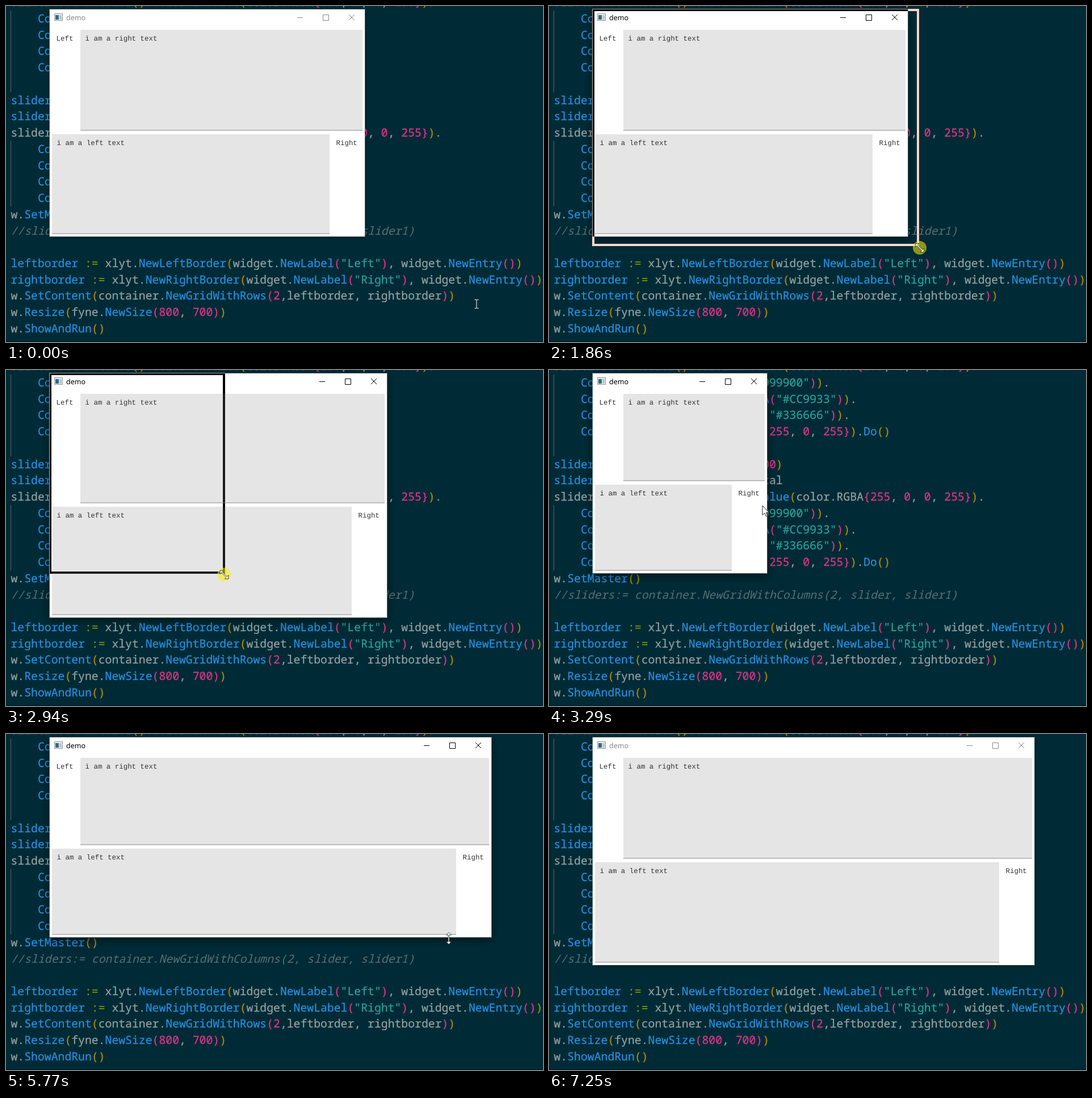
An HTML page for the animation above (7380 ms loop, 946 by 592 pixels).

```html
<!DOCTYPE html>
<html lang="en">
<head>
<meta charset="utf-8">
<title>demo</title>
<style>
html, body { margin: 0; width: 100%; height: 100%; overflow: hidden; background: #002b36; }
svg { display: block; width: 946px; height: 592px; }
text { white-space: pre; text-rendering: geometricPrecision; }
.code { font: 19.77px "Noto Sans Mono", monospace; color: #93a1a1; }
.code, .code tspan { fill: currentColor; stroke: currentColor; stroke-width: .25; }
.code .comment { font-style: italic; color: #586e75; stroke-width: 0; }
.fn { color: #268fe0; }
.op { color: #859900; }
.num { color: #dc3688; }
.str { color: #2aa198; }
.b0 { color: #b58900; }
.b1 { color: #dc3688; }
.ui { font: 12.45px "Liberation Mono", monospace; fill: #333; }
.title { font: 12.5px "Noto Sans", sans-serif; }
.entry { fill: #e5e5e5; }
.line { fill: #bdbdbd; }
.idle { filter: drop-shadow(0 1px 3px rgba(0,0,0,.5)); }
.active { filter: drop-shadow(0 4px 8px rgba(0,0,0,.55)); }
#edge { fill: none; stroke: #6d7f84; stroke-opacity: .6; }
#frame { fill: none; stroke: #fff; stroke-width: 4; mix-blend-mode: difference; }
#shape { fill: #fff; stroke: #222; }
</style>
</head>
<body>
<svg viewBox="0 0 946 592">
  <rect width="946" height="592" fill="#002b36"/>
  <rect y="590.5" width="946" height="1.5" fill="#001e26"/>
  <path d="M8.5 8V152M8.5 238V353" stroke="#4b6a70"/>
  <g id="code"></g>
  <g id="win">
    <rect id="pane" x="77" y="6" fill="#fff"/>
    <rect id="edge" x="76.5" y="5.5"/>
    <rect x="85.5" y="13.5" width="14" height="12" fill="#eef1f3" stroke="#8c979d"/>
    <rect x="87" y="16" width="6" height="8" fill="#2f6f80"/>
    <rect x="94" y="16" width="4" height="8" fill="#b9c6cb"/>
    <text id="title" class="title" x="106" y="25">demo</text>
    <path id="buttons" d="M-119 20.5h10M-73.5 15.5h10v10h-10zM-28 15l10 10M-18 15l-10 10" fill="none"/>
    <rect id="e1" class="entry" x="131" y="42"/>
    <rect id="l1" class="line" x="131" height="2"/>
    <rect id="e2" class="entry" x="81"/>
    <rect id="l2" class="line" x="81" height="2"/>
    <text class="ui" x="88.5" y="61">Left</text>
    <text class="ui" x="139.5" y="61">i am a right text</text>
    <text id="t2" class="ui" x="89.5">i am a left text</text>
    <text id="right" class="ui">Right</text>
  </g>
  <rect id="frame" x="78" y="7"/>
  <circle id="press" r="12" fill="#fff000" fill-opacity=".55"/>
  <g id="cursor"><path id="shape"/></g>
</svg>
<script>
const LOOP = 7380, STEP = 70;
const $ = id => document.getElementById(id);
const set = (id, attrs) => {
  for (const k in attrs) $(id).setAttribute(k, attrs[k]);
};

const stops = [
  '    ColorOne(xutil.HexToRGBA("#999900")).',
  '    ColorMiddle2(xutil.HexToRGBA("#CC9933")).',
  '    ColorMiddle(xutil.HexToRGBA("#336666")).',
  '    ColorMaxValue(color.RGBA{0, 255, 0, 255}).Do()'
];
const lines = [
  'slider.SetMaxColor().ColorMinValue(color.RGBA{255, 0, 0, 255}).',
  ...stops,
  '',
  'slider1 := xcomp.NewSlider(0, 100)',
  'slider1 := widget.SliderOnVertical',
  'slider1.SetMaxColor().ColorMinValue(color.RGBA{255, 0, 0, 255}).',
  ...stops,
  'w.SetMaster()',
  '//sliders:= container.NewGridWithColumns(2, slider, slider1)',
  '',
  'leftborder := xlyt.NewLeftBorder(widget.NewLabel("Left"), widget.NewEntry())',
  'rightborder := xlyt.NewRightBorder(widget.NewLabel("Right"), widget.NewEntry())',
  'w.SetContent(container.NewGridWithRows(2,leftborder, rightborder))',
  'w.Resize(fyne.NewSize(800, 700))',
  'w.ShowAndRun()'
];

// Colours one line of Go; bracket colour follows nesting depth.
function highlight(line) {
  if (line.startsWith('//')) return `<tspan class="comment">${line}</tspan>`;
  let depth = 0;
  const token = /"[^"]*"|:=|\b\d+\b|\w+(?=\(| :=)|[({})]/g;
  return line.replace(token, s => {
    let cls = 'fn';
    if (s[0] === '"') cls = 'str';
    else if (s === ':=') cls = 'op';
    else if (/^\d/.test(s)) cls = 'num';
    else if (/[({]/.test(s)) cls = 'b' + depth++ % 2;
    else if (/[)}]/.test(s)) cls = 'b' + --depth % 2;
    return `<tspan class="${cls}">${s}</tspan>`;
  });
}
$('code').innerHTML = lines.map((line, i) =>
  `<text class="code" x="8.5" y="${(0.3 + i * 28.73).toFixed(2)}">${highlight(line)}</text>`).join('');

const arrows = 'M-10.5 0L-6 -4.5V-1H6V-4.5L10.5 0L6 4.5V1H-6V4.5Z';
// outline, rotation, stroke width
const shapes = {
  text: ['M-3.5 -8H-.7L0 -7.3L.7 -8H3.5V-7H.5V7H3.5V8H.7L0 7.3L-.7 8H-3.5V7H-.5V-7H-3.5Z', 0, 0],
  diag: [arrows, 45, .8],
  ew: [arrows, 0, .8],
  ns: [arrows, 90, .8],
  arrow: ['M0 0V16.5L3.8 13L6.3 18.8L9 17.6L6.5 12H11.5Z', 0, 1]
};

// time, x, y, pointer shape
const pointer = [
  [0, 829, 525, 'text'], [580, 640, 415, 'diag'], [650, 627, 407, 'diag'],
  [790, 635, 410, 'diag'], [1720, 635, 410, 'diag'], [1860, 653, 426, 'diag'],
  [2060, 673, 440, 'diag'], [2530, 673, 440, 'diag'], [2940, 384.5, 360.5, 'diag'],
  [3080, 384.5, 360.5, 'arrow'], [3290, 376, 239, 'arrow'], [3500, 387, 254, 'ew'],
  [3900, 387, 254, 'ew'], [4390, 858, 257, 'ew'], [4600, 858, 257, 'arrow'],
  [4650, 831, 276, 'arrow'], [5430, 778, 355, 'arrow'], [5700, 780, 360, 'ns'],
  [6030, 780, 360, 'ns'], [6430, 780, 409, 'ns'], [6570, 780, 409, 'text'],
  [6970, 890, 576, 'text'], [7040, 890, 576, '']
];
// time, right, bottom of the resize outline
const outline = [
  [1720, 632, 406], [1860, 651, 422], [2060, 671, 436], [2530, 671, 436],
  [2940, 385, 358], [3900, 384, 358], [4390, 855, 358], [6030, 855, 358], [6430, 855, 407]
];
// time, right, bottom of the window
const sizes = [
  [0, 632, 406], [2130, 671, 436], [3080, 384, 358], [4600, 855, 358], [6570, 855, 407]
];
const drags = [[1790, 2130], [2600, 3080], [3970, 4600], [6100, 6570]];
const presses = [
  [990, 1190], [1390, 1520], [1590, 2130], [2530, 3080], [3640, 4600], [6030, 6570], [6900, 7040]
];

const within = (spans, t) => spans.some(([a, b]) => t >= a && t < b);
const last = (keys, t) => Math.max(0, keys.findLastIndex(k => k[0] <= t));
const shown = on => on ? 'visible' : 'hidden';

function at(keys, t) {
  const i = last(keys, t), a = keys[i], b = keys[i + 1];
  if (!b || t < a[0]) return [a[1], a[2], a[3]];
  const held = Math.floor((t - a[0]) / STEP + 1e-6) * STEP;
  const u = held / (b[0] - a[0]), e = u * u * (3 - 2 * u);
  return [a[1] + (b[1] - a[1]) * e, a[2] + (b[2] - a[2]) * e, a[3]];
}

function drawWindow(t) {
  const [, R, B] = sizes[last(sizes, t)];
  const active = t >= 990 && t < 7250;
  const mid = Math.floor((B + 38) / 2), ink = active ? '#000' : '#888';
  set('pane', { width: R - 77, height: B - 6, class: active ? 'active' : 'idle' });
  set('edge', { width: R - 76, height: B - 5 });
  set('title', { fill: ink });
  set('buttons', { transform: `translate(${R} 0)`, stroke: ink });
  set('e1', { width: R - 135, height: mid - 44 });
  set('l1', { width: R - 135, y: mid - 4 });
  set('e2', { width: R - 143, y: mid + 4, height: B - mid - 8 });
  set('l2', { width: R - 143, y: B - 6 });
  set('t2', { y: mid + 23 });
  set('right', { x: R - 50.5, y: mid + 23 });
}

function draw(t) {
  drawWindow(t);
  const [r, b] = at(outline, t);
  set('frame', { width: r - 79, height: b - 8, visibility: shown(within(drags, t)) });
  const [x, y, kind] = at(pointer, t);
  set('press', { cx: x, cy: y, visibility: shown(within(presses, t)) });
  const [d, angle, line] = shapes[kind] || ['', 0, 0];
  set('cursor', { transform: `translate(${x} ${y}) rotate(${angle})` });
  set('shape', { d, 'stroke-width': line });
}

const start = performance.now();
function tick() {
  draw((performance.now() - start) % LOOP);
  requestAnimationFrame(tick);
}
tick();
</script>
</body>
</html>
```
